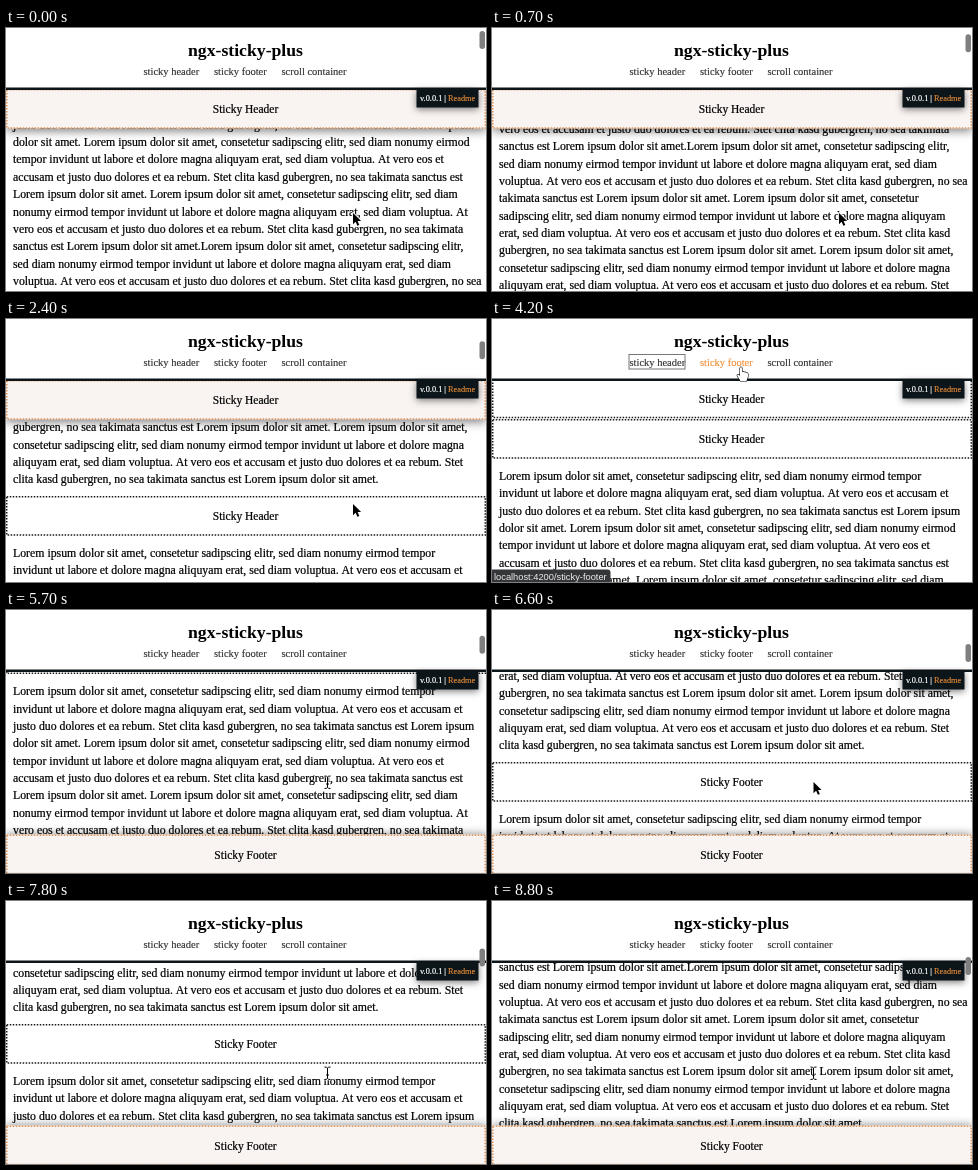
Recreate the animation shown at these times as an HTML page with a canvas. Size 480 by 263 pixels, loop 8.9 s.

```html
<!DOCTYPE html>
<html lang="en">
<head>
<meta charset="utf-8">
<title>ngx-sticky-plus</title>
<style>
html, body { margin: 0; width: 100%; height: 100%; overflow: hidden; background: #fff; }
canvas { display: block; width: 480px; height: 263px; }
</style>
</head>
<body>
<canvas id="stage"></canvas>
<script>
const W = 480, H = 263, LOOP = 8900, TICK = 100;
const SERIF = '"Liberation Serif", serif', SANS = '"Liberation Sans", sans-serif';
const PERIOD = 386, PITCH = 17.36, NAV_BOTTOM = 62;
const ORANGE = '#f0913a';

const canvas = document.getElementById('stage');
const ctx = canvas.getContext('2d');
const dpr = window.devicePixelRatio || 1;
canvas.width = W * dpr;
canvas.height = H * dpr;

const LINES = [
  'Lorem ipsum dolor sit amet, consetetur sadipscing elitr, sed diam nonumy eirmod tempor',
  'invidunt ut labore et dolore magna aliquyam erat, sed diam voluptua. At vero eos et accusam et',
  'justo duo dolores et ea rebum. Stet clita kasd gubergren, no sea takimata sanctus est Lorem ipsum',
  'dolor sit amet. Lorem ipsum dolor sit amet, consetetur sadipscing elitr, sed diam nonumy eirmod',
  'tempor invidunt ut labore et dolore magna aliquyam erat, sed diam voluptua. At vero eos et',
  'accusam et justo duo dolores et ea rebum. Stet clita kasd gubergren, no sea takimata sanctus est',
  'Lorem ipsum dolor sit amet. Lorem ipsum dolor sit amet, consetetur sadipscing elitr, sed diam',
  'nonumy eirmod tempor invidunt ut labore et dolore magna aliquyam erat, sed diam voluptua. At',
  'vero eos et accusam et justo duo dolores et ea rebum. Stet clita kasd gubergren, no sea takimata',
  'sanctus est Lorem ipsum dolor sit amet.Lorem ipsum dolor sit amet, consetetur sadipscing elitr,',
  'sed diam nonumy eirmod tempor invidunt ut labore et dolore magna aliquyam erat, sed diam',
  'voluptua. At vero eos et accusam et justo duo dolores et ea rebum. Stet clita kasd gubergren, no sea',
  'takimata sanctus est Lorem ipsum dolor sit amet. Lorem ipsum dolor sit amet, consetetur',
  'sadipscing elitr, sed diam nonumy eirmod tempor invidunt ut labore et dolore magna aliquyam',
  'erat, sed diam voluptua. At vero eos et accusam et justo duo dolores et ea rebum. Stet clita kasd',
  'gubergren, no sea takimata sanctus est Lorem ipsum dolor sit amet. Lorem ipsum dolor sit amet,',
  'consetetur sadipscing elitr, sed diam nonumy eirmod tempor invidunt ut labore et dolore magna',
  'aliquyam erat, sed diam voluptua. At vero eos et accusam et justo duo dolores et ea rebum. Stet',
  'clita kasd gubergren, no sea takimata sanctus est Lorem ipsum dolor sit amet.'
];

const LINKS = [
  { text: 'sticky header', x: 137.5, w: 55.5, path: 'sticky-header' },
  { text: 'sticky footer', x: 208, w: 52.5, path: 'sticky-footer' },
  { text: 'scroll container', x: 275.5, w: 66, path: 'scroll-container' }
];

// [time, scroll offset]
const SCROLL = [
  [0, 95], [700, 195], [900, 195], [1500, 440], [1800, 447], [2000, 447],
  [2400, 695], [2900, 755], [3500, 772], [5500, 772], [6400, 1063],
  [6600, 1066], [7300, 1338], [7400, 1345], [7600, 1432], [7800, 1481],
  [8200, 1718], [8800, 1751]
];

// [time, x, y]
const POINTER = [
  [3000, 347, 185], [3600, 165, 43], [3800, 165, 43], [4200, 249, 48],
  [4500, 249, 48], [5200, 319, 158], [5300, 321.5, 172]
];

// Monotone cubic interpolation through the keys.
function track(keys, t, col = 1) {
  const last = keys.length - 1;
  if (t <= keys[0][0]) return keys[0][col];
  if (t >= keys[last][0]) return keys[last][col];
  const slope = i => (keys[i + 1][col] - keys[i][col]) / (keys[i + 1][0] - keys[i][0]);
  const tangent = i => {
    if (i === 0 || i === last) return 0;
    const a = slope(i - 1), b = slope(i);
    return a * b <= 0 ? 0 : 2 * a * b / (a + b);
  };
  let i = 0;
  while (t > keys[i + 1][0]) i++;
  const d = keys[i + 1][0] - keys[i][0], u = (t - keys[i][0]) / d, v = 1 - u;
  return keys[i][col] * (1 + 2 * u) * v * v + keys[i + 1][col] * u * u * (3 - 2 * u)
    + d * u * v * (tangent(i) * v - tangent(i + 1) * u);
}

const scrollAt = t => track(SCROLL, Math.max(0, t));
const isFooterPage = t => t >= 4400;
const flowY = (footer, k, s) => (footer ? 80 : 120) + PERIOD * k - s;

// Centre of bar k and whether it is held at the edge.
function barAt(footer, k, t) {
  const flow = flowY(footer, k, scrollAt(t));
  if (footer) {
    const y = Math.max(Math.min(flow, 244.5), flow - PERIOD + 40.5);
    return { y, pinned: y === 244.5 && flow > y };
  }
  const y = Math.min(Math.max(flow, 81), flow + PERIOD - 40.5);
  return { y, pinned: y === 81 && flow < y };
}

// Share of the last moments spent pinned: a linear colour transition.
function pinAmount(footer, k, t) {
  let n = 0;
  for (let i = 0; i < 3; i++) n += barAt(footer, k, t - i * TICK).pinned;
  return n / 3;
}

const mix = (a, b, p) => 'rgb(' + a.map((v, i) => Math.round(v + (b[i] - v) * p)) + ')';

function label(text, x, y, size, { color = '#000', align = 'left', weight = '', family = SERIF, bold = 0.22 } = {}) {
  ctx.font = `${weight} ${size}px ${family}`;
  ctx.textAlign = align;
  ctx.fillStyle = ctx.strokeStyle = color;
  ctx.fillText(text, x, y);
  if (bold) {
    ctx.lineWidth = bold;
    ctx.strokeText(text, x, y);
  }
}

function rect(x, y, w, h, color) {
  ctx.fillStyle = color;
  ctx.fillRect(x, y, w, h);
}

function shadow(alpha, blur, dy) {
  ctx.shadowColor = `rgba(0,0,0,${alpha})`;
  ctx.shadowBlur = blur * dpr;
  ctx.shadowOffsetY = dy * dpr;
}

function drawBar(footer, k, t) {
  const { y } = barAt(footer, k, t);
  if (y < 30 || y > H + 25) return;
  const p = pinAmount(footer, k, t);
  ctx.save();
  if (p === 1) shadow(0.5, 9, footer ? -1 : 2);
  rect(0, y - 20, W, 39.5, mix([255, 255, 255], [249, 244, 242], p));
  ctx.restore();
  ctx.save();
  ctx.setLineDash([1.5, 1.5]);
  ctx.lineWidth = 1.5;
  ctx.strokeStyle = mix([25, 25, 25], [222, 145, 85], p);
  ctx.strokeRect(0.75, y - 19.3, W - 1.5, 38.4);
  ctx.restore();
  label(footer ? 'Sticky Footer' : 'Sticky Header', 239.5, y + 4, 11.5, { align: 'center' });
}

function drawPage(footer, t) {
  const s = scrollAt(t);
  const first = Math.floor(s / PERIOD) - 1;
  for (let k = first; k < first + 4; k++) {
    if (k < -1) continue;
    const top = flowY(footer, k, s) + 37;
    LINES.forEach((line, i) => {
      const y = top + i * PITCH;
      if (y > 45 && y < H + 12) label(line, 7, y + 4, 11.8);
    });
  }
  for (let k = Math.max(0, first); k < first + 5; k++) drawBar(footer, k, t);
}

function drawNav(t, hover) {
  rect(0, 0, W, 60, '#fff');
  rect(0, 59.5, W, 2.5, '#0c151a');
  label('ngx-sticky-plus', 239.5, 27.5, 17.7, { align: 'center', weight: 'bold', bold: 0 });
  for (const link of LINKS) {
    label(link.text, link.x, 47, 10.5, { color: link === hover ? ORANGE : '#333', bold: 0.15 });
  }
  const focus = t >= 3700 && t < 4400 ? LINKS[0] : t >= 4400 && t < 5000 ? LINKS[1] : null;
  if (focus) {
    ctx.strokeStyle = '#777';
    ctx.lineWidth = 1;
    ctx.strokeRect(focus.x - 0.5, 35.5, focus.w + 0.5, 14.5);
  }
  ctx.save();
  shadow(0.5, 7, 2);
  rect(410.5, 61, 62, 18.5, '#0c151a');
  ctx.restore();
  label('v.0.0.1 |', 414, 73, 8.3, { color: '#fff' });
  label('Readme', 442, 73, 8.3, { color: ORANGE, bold: 0.1 });
}

function drawThumb(t) {
  const alpha = t < 3500 || t >= 5600 ? 1 : Math.max(0, 1 - (t - 3500) / 300);
  if (!alpha) return;
  ctx.globalAlpha = alpha;
  ctx.fillStyle = '#7f7f7f';
  ctx.beginPath();
  ctx.roundRect(473.5, scrollAt(t) * 0.032, 5.5, 18, 2.75);
  ctx.fill();
  ctx.globalAlpha = 1;
}

function drawStatus(link) {
  ctx.fillStyle = '#35363a';
  ctx.beginPath();
  ctx.roundRect(-4, 250.5, 122.5, 18, 3);
  ctx.fill();
  label('localhost:4200/' + link.path, 2, 260.5, 9.3, { color: '#eee', family: SANS, bold: 0 });
}

const ARROW = new Path2D('M0 0V11.2L2.6 8.8L4.4 12.8L6.3 12L4.6 8.1H8.1Z');
const HAND = new Path2D('M-1 1Q0 -.8 1 1V5Q2.2 4 3 5.4Q4.4 4.6 5 6Q6.8 5.4 7 7.2V9.5L5.5 14H-.5L-3.8 8.7Q-3.8 7 -2.2 7.7L-1 9Z');
const BEAM = new Path2D('M-3 -6Q-.5 -6 0 -5Q.5 -6 3 -6M0 -5V5.5M-3 6.5Q-.5 6.5 0 5.5Q.5 6.5 3 6.5M-1.5 2H1.5');

function drawPointer(x, y, kind) {
  ctx.save();
  ctx.translate(x, y);
  ctx.lineJoin = 'round';
  if (kind === 'beam') {
    ctx.lineWidth = 2.2;
    ctx.strokeStyle = '#fff';
    ctx.stroke(BEAM);
    ctx.lineWidth = 1;
    ctx.strokeStyle = '#000';
    ctx.stroke(BEAM);
  } else {
    const hand = kind === 'hand', path = hand ? HAND : ARROW;
    ctx.lineWidth = hand ? 1.1 : 1.8;
    ctx.strokeStyle = hand ? '#000' : '#fff';
    ctx.fillStyle = hand ? '#fff' : '#000';
    ctx.stroke(path);
    ctx.fill(path);
  }
  ctx.restore();
}

function pointerKind(footer, t, y, hover) {
  if (hover) return 'hand';
  if (!footer || y < NAV_BOTTOM) return 'arrow';
  for (let k = 0; k < 7; k++) {
    if (Math.abs(barAt(true, k, t).y - y) < 20) return 'arrow';
  }
  return 'beam';
}

function draw(t) {
  const footer = isFooterPage(t);
  const x = track(POINTER, t, 1), y = track(POINTER, t, 2);
  const hover = LINKS.find(l => y > 34 && y < 52 && x > l.x && x < l.x + l.w);
  ctx.setTransform(dpr, 0, 0, dpr, 0, 0);
  rect(0, 0, W, H, '#fff');
  drawPage(footer, t);
  drawNav(t, hover);
  drawThumb(t);
  if (hover) drawStatus(hover);
  drawPointer(x, y, pointerKind(footer, t, y, hover));
}

const start = performance.now();
function loop() {
  const t = (performance.now() - start) % LOOP;
  draw(Math.floor(t / TICK) * TICK);
  requestAnimationFrame(loop);
}
loop();
</script>
</body>
</html>
```
